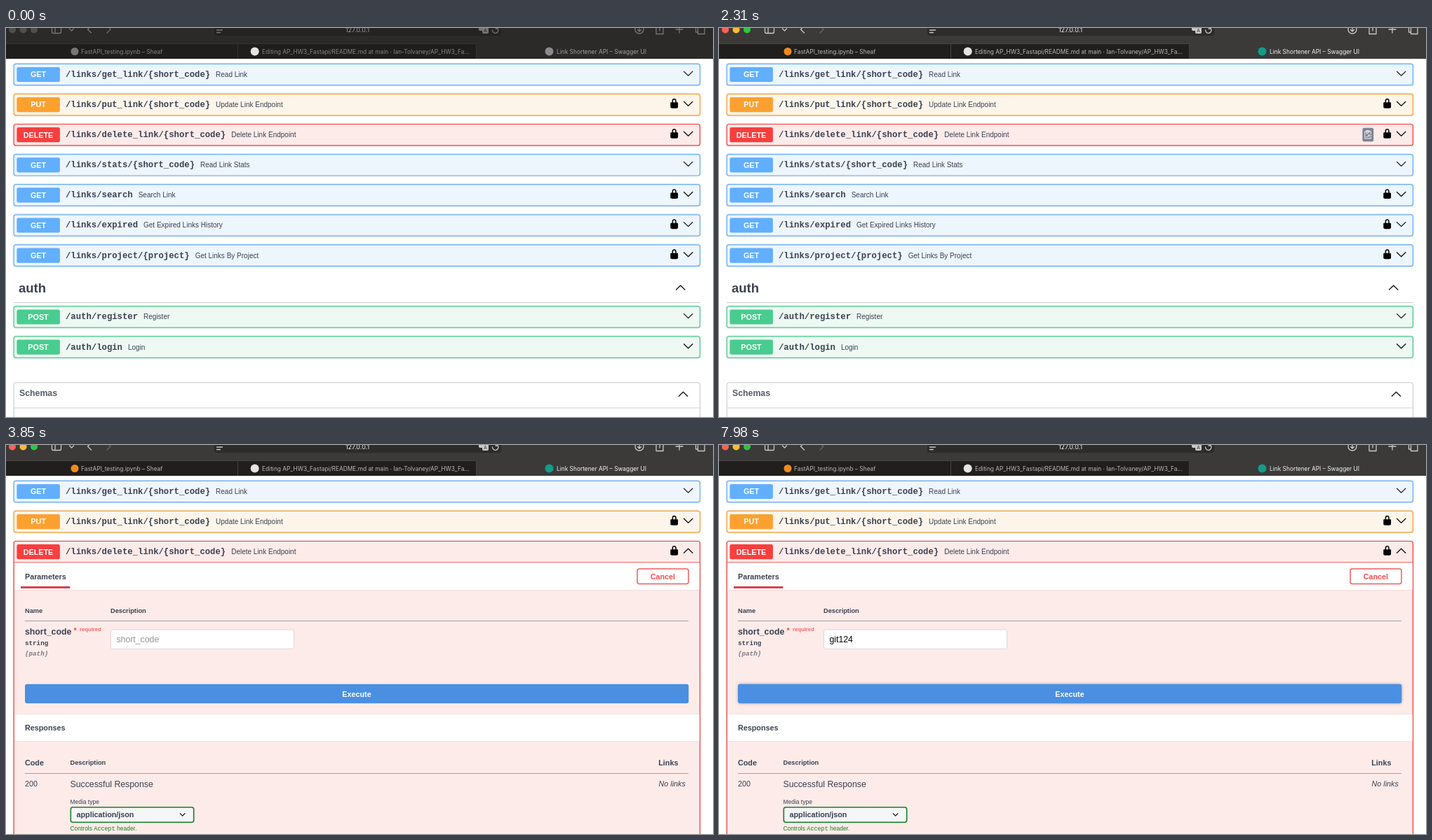
An HTML page for the animation above (8 s loop, 1008 by 556 pixels).

```html
<!DOCTYPE html>
<html lang="en">
<head>
<meta charset="utf-8">
<title>Link Shortener API</title>
<style>
html, body { margin: 0; width: 100%; height: 100%; overflow: hidden; background: #fff; }
svg { display: block; }
#stage { --bar: #3b3a39; --strip: #201f1e; --field: #2d2c2b; --icon: #c9c8c7; --tab: #b9b8b7; --current: #f4f4f4;
  --red: #fe5f57; --yellow: #febc2e; --green: #28c840; --orange: #f08a1d; --teal: #129c8b; --edge: #454443; }
#stage.idle { --bar: #2b2a29; --strip: #1f1e1d; --field: #242322; --icon: #777675; --tab: #858483; --current: #a09f9e;
  --red: #504f4e; --yellow: #504f4e; --green: #504f4e; --orange: #777; --teal: #8b8b8b; --edge: #353433; }
text { font: 10.77px "Liberation Sans", Arial, sans-serif; fill: #3b4151; white-space: pre; }
.ui { font-family: Inter, sans-serif; }
.mono { font-family: "Liberation Mono", "Courier New", monospace; }
.b { font-weight: bold; }
.i { font-style: italic; }
.mid { text-anchor: middle; }
.line { fill: none; stroke-width: 1.3; stroke-linecap: round; stroke-linejoin: round; }
.card { filter: drop-shadow(0 0 1.1px rgba(0, 0, 0, .19)); }
.head { fill: #fff; filter: drop-shadow(0 .8px .8px rgba(0, 0, 0, .1)); }
</style>
</head>
<body>
<svg id="stage" width="1008" height="556" viewBox="0 0 1008 556"></svg>
<script>
const LOOP = 8000;
const methods = {
  GET: ['#61affe', '#edf5fd'], PUT: ['#fca130', '#fdf5ea'],
  DELETE: ['#f93e3e', '#fdebe9'], POST: ['#49cc90', '#edf9f2']
};
const lockPath = 'M15.8 8H14V5.6C14 2.7 12.7 1 10 1S6 2.7 6 5.6V8H4c-.6 0-1 .6-1 1.2V17c0 .6.4 1.1 1 1.3' +
  'l1.2.4c.5.2 1.4.3 1.9.3h5.8c.5 0 1.4-.1 2-.3l1.2-.4c.5-.2.9-.8.9-1.3V9.2C17 8.6 16.4 8 15.8 8zM12 8H8V5.2C8 3.8 8.8 3 10 3s2 .8 2 2.2z';

const text = (x, y, str, size = 10.77, cls = '', fill = '#3b4151', attrs = '') =>
  `<text x="${x}" y="${y}" class="${cls}" style="font-size:${size}px;fill:${fill}" ${attrs}>${str}</text>`;
const rect = (x, y, w, h, fill, attrs = '') =>
  `<rect x="${x}" y="${y}" width="${w}" height="${h}" fill="${fill}" ${attrs}/>`;
const dot = (x, y, r, fill) => `<circle cx="${x}" cy="${y}" r="${r}" fill="${fill}"/>`;
const line = (d, stroke = '#111', attrs = '') => `<path class="line" d="${d}" stroke="${stroke}" ${attrs}/>`;
const rule = (y, x1, x2, stroke) => rect(x1, y, x2 - x1, 1, stroke);
const chevron = (x, y, up) => line(`M${x - 6.2} ${y + (up ? 3 : -3)}l6.2 ${up ? -6 : 6}l6.2 ${up ? 6 : -6}`);

function row(y, method, path, summary, locked, open) {
  const [color, tint] = methods[method];
  return rect(11.2, y, 978.2, open ? 440 : 30.4, tint, `stroke="${color}" stroke-width="1.2" rx="3" class="card"`) +
    rect(15.4, y + 4.6, 61.5, 21.2, color, 'rx="2.3"') +
    text(46, y + 19, method, 10.77, 'b mid', '#fff') +
    text(85, y + 18.6, path, 12.27, 'mono b') +
    text(93 + 7.36 * path.length, y + 18.6, summary, 10) +
    (locked ? `<path transform="translate(945 ${y + 5.7}) scale(.77)" d="${lockPath}"/>` : '') +
    chevron(972.7, y + 13.8, open);
}
const linkRow = (i, ...rest) => row(51.3 + 43.1 * i, ...rest);
const deleteRow = open =>
  linkRow(2, 'DELETE', '/links/delete_link/{short_code}', 'Delete Link Endpoint', true, open);

const browser = () => {
  const ink = 'var(--icon)';
  return rect(0, 0, 1008, 23, 'var(--bar)') + rect(0, 22, 670, 22, 'var(--strip)') + rect(670, 22, 338, 22, 'var(--bar)') +
    rule(22, 0, 670, 'var(--edge)') + rect(330, 23, 1, 21, 'var(--edge)') + rect(670, 23, 1, 21, 'var(--edge)') +
    rect(296, -12, 411, 24, 'var(--field)', 'rx="5" stroke="var(--edge)" stroke-width=".7"') +
    dot(9, 2.5, 5, 'var(--red)') + dot(24.5, 2.5, 5, 'var(--yellow)') + dot(40, 2.5, 5, 'var(--green)') +
    line('M65.5-4V5.5q0 2 2 2h9q2 0 2-2V-4M70-4V7.5M90.5 1l3 3 3-3M121.5-3l-5 5 5 5', ink) +
    line('M144-3l5 5-5 5', '#666564') +
    line('M300.5-1h8M300.5 3h8M300.5 6.5h5', ink) +
    text(501, 6.3, '127.0.0.1', 9, 'ui mid', 'var(--current)') +
    rect(674, -5, 8, 9, ink, 'rx="2"') + rect(679, -1, 9, 9, ink, 'rx="2"') +
    text(683.5, 6, 'A', 6.5, 'ui mid', 'var(--field)') +
    line('M693.5 3a4.2 4.2 0 1 0 7.5-2.5M701-2v3h-3', ink) +
    line('M909 2a6 6 0 1 1-12 0a6 6 0 1 1 12 0M903-2v7M900.5 2.5l2.5 2.5 2.5-2.5', ink) +
    line('M927 0V8.5h10V0M932-4V4M955 2h10M960-3V7M983.5-2V6h3M986.5-1.5H996V8.5h-9.5z', ink) +
    dot(98, 33.5, 5.5, 'var(--orange)') + text(107, 36.7, 'FastAPI_testing.ipynb – Sheaf', 8.35, 'ui', 'var(--tab)') +
    dot(354.7, 33.5, 6, '#e4e4e4') +
    text(365, 36.7, 'Editing AP_HW3_Fastapi/README.md at main · Ian-Tolvaney/AP_HW3_Fa…', 8.35, 'ui', 'var(--tab)') +
    dot(774.5, 33.5, 6, 'var(--teal)') + text(785, 36.7, 'Link Shortener API – Swagger UI', 8.35, 'ui', 'var(--current)');
};

const list = () => deleteRow(false) +
  linkRow(3, 'GET', '/links/stats/{short_code}', 'Read Link Stats') +
  linkRow(4, 'GET', '/links/search', 'Search Link', true) +
  linkRow(5, 'GET', '/links/expired', 'Get Expired Links History', true) +
  linkRow(6, 'GET', '/links/project/{project}', 'Get Links By Project', true) +
  text(18, 378.3, 'auth', 18.46, 'b') + chevron(961.7, 371, true) + rule(392, 11, 990, '#c8cacf') +
  row(397.8, 'POST', '/auth/register', 'Register') + row(440.9, 'POST', '/auth/login', 'Login') +
  rect(11.2, 506.8, 978.2, 80, '#fff', 'rx="3" stroke="#c4c6cb"') +
  text(19, 526.3, 'Schemas', 12.3, 'b', '#555b69') + chevron(965.5, 523.3, true) + rule(542.5, 11, 990, '#d0d2d6');

const panel = () => {
  const gray = '#a69fa5', green = '#12802a';
  return deleteRow(true) +
    rect(12, 168, 976.8, 39, '#fff', 'class="head"') + rule(167.3, 11.5, 989.2, '#f0605f') +
    text(27, 191.5, 'Parameters', 10.77, 'b') + rect(21, 202, 70.3, 3, '#d8434b') +
    rect(900, 177, 73, 21.6, '#fff', 'id="cancel" rx="3" stroke="#f45b59" stroke-width="1.5"') +
    text(936.3, 191.5, 'Cancel', 10.77, 'b mid', '#ee4d4f') +
    text(27, 240, 'Name', 9.23, 'b') + text(149, 240, 'Description', 9.23, 'b') + rule(251, 27, 973, gray) +
    text(27, 270.7, 'short_code', 12.3, 'b') + text(96.5, 269, '*', 11, 'b', '#f54848') +
    text(105, 266.2, 'required', 7.7, 'b', '#f86161') +
    text(27, 286.2, 'string', 9.23, 'mono b') + text(27, 300.7, '(path)', 9.23, 'mono b i', '#7f7a81') +
    rect(149.4, 264, 261.2, 27.4, '#fff', 'rx="3" stroke="#dcd7d7"') +
    rect(148.3, 262.8, 263.6, 29.8, '#fff', 'id="ring" rx="4" stroke="#78a4df" stroke-width="2.4"') +
    text(157.4, 281.7, 'short_code', 12.3, '', '#969696', 'id="hint"') +
    text(157.4, 281.7, 'git124', 12.3, '', '#000', 'id="value"') +
    rect(158, 270.5, 1.5, 14, '#3f82e8', 'id="caret"') +
    rect(27, 341.7, 946.3, 27.5, '#4a8fe1', 'id="execute" rx="3"') + text(500, 359.6, 'Execute', 10.77, 'b mid', '#fff') +
    rect(12, 385, 976.8, 38, '#fff', 'class="head"') + text(27, 408, 'Responses', 10.77, 'b') +
    text(27, 458, 'Code', 10.77, 'b') + text(91.5, 457, 'Description', 9.23, 'b') + text(930.3, 458, 'Links', 10.77, 'b') +
    rule(469, 27, 973, gray) +
    text(27, 488, '200') + text(91.5, 488.8, 'Successful Response', 12.3) + text(930.5, 488, 'No links', 10.77, 'i') +
    text(91.5, 512.7, 'Media type', 8.46) +
    rect(92.3, 517.8, 175.4, 21.4, '#f5f6f5', `rx="3" stroke="${green}" stroke-width="1.6"`) +
    text(100.5, 532.2, 'application/json', 10.77, 'b') + line('M248.3 526.8l3.3 3.3 3.3-3.3', '#222') +
    text(91.5, 550.8, 'Controls <tspan class="mono">Accept</tspan> header.', 8.46, '', green);
};

const copyButton = `<svg id="copy" y="142.4" height="20" overflow="hidden">
  <rect width="100%" height="100%" rx="3" fill="#7d8492"/>
  <g id="clip">${line('M4-1V-4.5H-4.5V5.5H4V4M-2-5.8h3.6v2.4H-2zM5 1.5H0M2-.5L0 1.5l2 2M-2.5-1.5h2.5M-2.5 3h2', '#fff', 'style="stroke-width:.9"')}</g></svg>`;

const $ = id => document.getElementById(id);
const stage = $('stage');
stage.innerHTML = browser() +
  linkRow(0, 'GET', '/links/get_link/{short_code}', 'Read Link') +
  linkRow(1, 'PUT', '/links/put_link/{short_code}', 'Update Link Endpoint', true) +
  `<g id="list">${list()}</g><g id="panel">${panel()}</g>` + copyButton;

const ramp = (t, start, length) => Math.min(1, Math.max(0, (t - start) / length));

// CSS "ease": cubic-bezier(.25, .1, .25, 1)
function ease(x) {
  const curve = (u, a, b) => 3 * u * (1 - u) ** 2 * a + 3 * u * u * (1 - u) * b + u ** 3;
  let lo = 0, hi = 1;
  for (let i = 0; i < 20; i++) {
    const mid = (lo + hi) / 2;
    if (curve(mid, .25, .25) < x) lo = mid; else hi = mid;
  }
  return curve(lo, .1, 1);
}
const fade = (t, start, length = 500) => ease(ramp(t, start, length));

// The pointer enters the row, leaves briefly, comes back, then leaves for good.
function rowHover(t) {
  const leave = 2260, back = 2575;
  if (t < 980) return 0;
  if (t < leave) return fade(t, 885);
  if (t < back) return 1 - fade(t, leave);
  if (t >= 3370) return 1 - fade(t, 3370);
  const low = 1 - fade(back, leave);
  return low + (1 - low) * fade(t, back, 500 * (1 - low));
}

const show = (id, on) => $(id).style.display = on ? '' : 'none';
const glow = (id, amount) =>
  $(id).style.filter = amount ? `drop-shadow(0 0 1.9px rgba(0,0,0,${.3 * amount}))` : 'none';

function draw(t) {
  const focused = t >= 5530 && t < 7980, pasted = t >= 6440;
  stage.classList.toggle('idle', t < 980);
  show('list', t < 3010);
  show('panel', t >= 3010);

  const hover = rowHover(t), width = 18 * hover;
  show('copy', width > .2);
  $('copy').setAttribute('width', width);
  $('copy').setAttribute('x', 938 - 5 * hover - width);
  $('clip').setAttribute('transform', `translate(${width / 2} 10)`);

  show('ring', focused);
  show('hint', !pasted);
  show('value', pasted);
  const still = t - (pasted ? 6440 : 5530);
  $('caret').setAttribute('x', pasted ? 191.2 : 158);
  $('caret').style.opacity = focused ? 1 - ramp(still, 500, 200) + ramp(still, 920, 200) : 0;

  glow('cancel', ramp(t, 4300, 390) - ramp(t, 4760, 210));
  glow('execute', fade(t, 7390, 300));
}

function tick() {
  draw(performance.now() % LOOP);
  requestAnimationFrame(tick);
}
tick();
</script>
</body>
</html>
```
